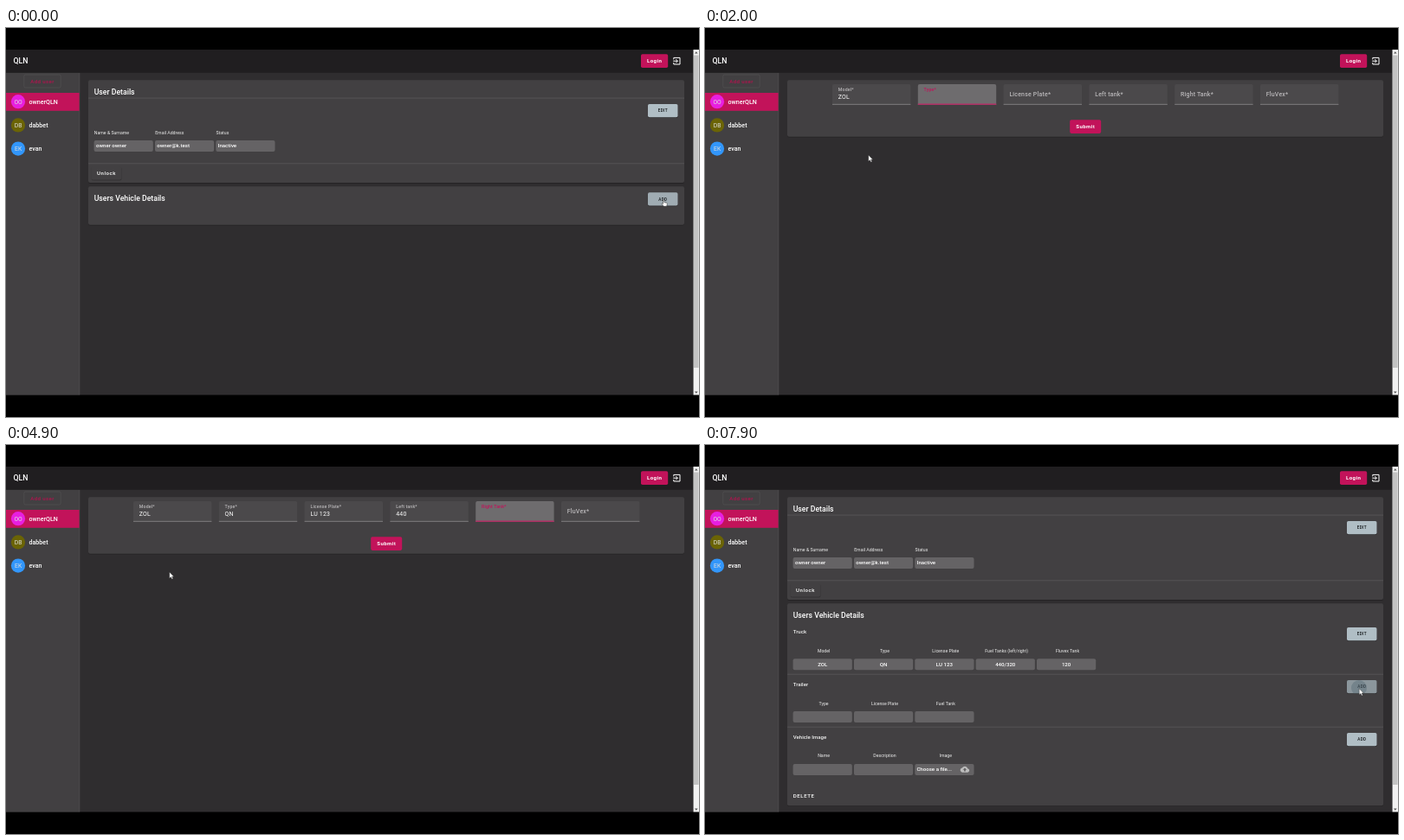
Recreate the animation shown at these times as an HTML page. Size 800 by 450 pixels, loop 8000 ms.

```html
<!DOCTYPE html>
<html lang="en">
<head>
<meta charset="utf-8">
<title>User panel</title>
<style>
html, body { margin: 0; width: 100%; height: 100%; overflow: hidden; background: #000; }
svg { display: block; width: 800px; height: 450px; font-family: Roboto, sans-serif; }
text { white-space: pre; }
</style>
</head>
<body>
<svg id="stage" viewBox="0 0 800 450"></svg>
<script>
const LOOP = 8000, PINK = '#c2135a', CARD = '#424042', WHITE = '#fff';
const stage = document.getElementById('stage');

const rect = (x, y, w, h, fill, r = 0, extra = '') =>
  `<rect x="${x}" y="${y}" width="${w}" height="${h}" rx="${r}" fill="${fill}" ${extra}/>`;

// Text placed by the middle of its capitals
function text(str, x, y, size, { fill = WHITE, weight = 500, anchor = 'start', gap = 0, extra = '' } = {}) {
  return `<text x="${x}" y="${(y + size * 0.355).toFixed(2)}" font-size="${size}" fill="${fill}" ` +
    `font-weight="${weight}" text-anchor="${anchor}" letter-spacing="${gap}" ${extra}>${str}</text>`;
}

const rule = y => rect(95, y, 688, 0.7, '#5c5a5c');
const card = (y, h) => rect(95, y + 0.8, 688, h, '#252325', 2) + rect(95, y, 688, h, CARD, 2);

function greyButton(label, y, id = '') {
  return rect(741, y + 0.8, 34.5, 15.2, '#2b292b', 1.8) +
    rect(741, y, 34.5, 15.2, '#b0bec5', 1.8, id && `id="${id}"`) +
    text(label, 758.3, y + 7.7, 4.6, { fill: '#252a2d', weight: 700, anchor: 'middle', gap: 0.35 });
}

const colX = i => 101.6 + i * 70.35;

function box(i, y, value, centred) {
  const x = colX(i);
  return rect(x, y, 68.2, 13, '#656365', 2) +
    text(value, centred ? x + 34.1 : x + 2.4, y + 6.3, 6.1, { anchor: centred ? 'middle' : 'start' });
}

function row(y, labels, values) {
  return labels.map((label, i) =>
    text(label, colX(i) + 35.5, y, 5.2, { fill: '#eee', weight: 400, anchor: 'middle' }) +
    box(i, y + 9.4, values[i] || '', true)).join('');
}

function person(y, colour, initials, name) {
  return `<circle cx="14" cy="${y}" r="8.1" fill="${colour}"/>` +
    text(initials, 14.1, y, 6.8, { fill: '#ddd', weight: 400, anchor: 'middle' }) +
    text(name, 26.5, y, 7.1);
}

const frame = rect(0, 25, 793.5, 399.5, '#2f2d2f') +
  rect(0, 51.5, 84.6, 373, CARD) + rect(84.4, 51.5, 0.8, 373, '#545254') +
  rect(0, 25, 793.5, 26.8, '#201e20') +
  text('QLN', 8.5, 38.2, 8.7) +
  rect(733, 30.2, 31.2, 15.8, PINK, 1.8) +
  text('Login', 748.7, 38, 6.2, { weight: 700, anchor: 'middle', gap: 0.35 }) +
  `<g fill="none" stroke="#fff" stroke-width="1"><path d="M770.8 36.4V34.4H778V42H770.8V40"/>
   <path d="M770.2 38.2H775.2M773.3 36.1L775.4 38.2L773.3 40.3"/></g>` +
  rect(20.8, 54, 42.4, 15, 'none', 1.8, 'stroke="#575557" stroke-width=".6"') +
  text('Add user', 42, 61.6, 6.1, { fill: '#b3124e', anchor: 'middle', gap: 0.4 }) +
  rect(0, 75, 84.6, 20.8, PINK) +
  person(85.2, '#e81fe0', 'OO', 'ownerQLN') +
  person(112.4, '#6b6405', 'DB', 'dabbet') +
  person(139.6, '#3296fa', 'EK', 'evan') +
  rect(793.5, 25, 6.5, 399.5, '#f1f1f1') + rect(794, 31.5, 5.6, 361.5, '#c3c3c3') +
  `<path d="M795 29.4L796.8 27.2L798.6 29.4ZM795 420.6L796.8 422.8L798.6 420.6Z" fill="#555"/>`;

const userCard = card(60.3, 118.8) + text('User Details', 101.7, 74.2, 8.7) + rule(80.7) +
  greyButton('EDIT', 88) +
  ['Name &amp; Surname', 'Email Address', 'Status'].map((s, i) =>
    text(s, colX(i) + 0.2, 120.9, 5.2, { fill: '#eee', weight: 400 })).join('') +
  ['owner owner', 'owner@k.test', 'Inactive'].map((s, i) => box(i, 130, s, false)).join('') +
  rule(156.5) + rect(98.5, 161, 35, 15.4, '#343234', 1.8) + rect(98.2, 160, 35, 15.4, CARD, 1.8) +
  text('Unlock', 105, 168, 6.1, { gap: 0.54 });

const vehicleTitle = text('Users Vehicle Details', 101.7, 197.3, 8.7);
const emptyVehicle = card(183.3, 44.4) + vehicleTitle + greyButton('ADD', 190.3, 'addVehicle');

const section = (name, y) => text(name, 101.7, y, 6.1, { fill: '#f0f0f0' });
const cloud = 'M19.35 10.04C18.67 6.59 15.64 4 12 4 9.11 4 6.6 5.64 5.35 8.04 2.34 8.36 0 10.91 0 14c0 3.31 2.69 6 6 6h13c2.76 0 5-2.24 5-5 0-2.64-2.05-4.78-4.65-4.96zM14 13v4h-4v-4H7l5-5 5 5z';
const fullVehicle = card(183.3, 234) + vehicleTitle +
  section('Truck', 215.5) + greyButton('EDIT', 211) +
  row(237.8, ['Model', 'Type', 'License Plate', 'Fuel Tanks (left/right)', 'Fluvex Tank'],
    ['ZOL', 'QN', 'LU 123', '440/320', '120']) +
  rule(264.8) + section('Trailer', 276.5) + greyButton('ADD', 272, 'addTrailer') +
  '<clipPath id="clip">' + rect(741, 272, 34.5, 15.2, WHITE, 1.8) + '</clipPath>' +
  '<circle id="ripple" cx="755" cy="281" r="0" fill="#586a75" fill-opacity=".45" clip-path="url(#clip)"/>' +
  row(298.7, ['Type', 'License Plate', 'Fuel Tank'], []) +
  rule(325.8) + section('Vehicle Image', 337.5) + greyButton('ADD', 333) +
  row(359.6, ['Name', 'Description', 'Image'], []) +
  text('Choose a file...', 244.4, 375.3, 6.1) +
  `<path transform="translate(294.7 370) scale(.435)" d="${cloud}" fill="#bdbdbd"/>` +
  text('DELETE', 101.8, 406.2, 6.1, { gap: 0.54 });

// focus: when the field gains focus; keys: when each character appears
const fields = [
  { label: 'Model*', value: 'ZOL', focus: 960, keys: [1450, 1550, 1670] },
  { label: 'Type*', value: 'QN', focus: 1780, keys: [2300, 2480] },
  { label: 'License Plate*', value: 'LU 123', focus: 2760, keys: [3150, 3250, 3340, 3400, 3480, 3560] },
  { label: 'Left tank*', value: '440', focus: 3670, keys: [4150, 4250, 4380] },
  { label: 'Right Tank*', value: '320', focus: 4680, keys: [4920, 4990, 5080] },
  { label: 'FluVex*', value: '120', focus: 5260, keys: [5580, 5750, 5900] }
];
const fieldX = i => 147 + i * 98.8;

const form = card(60.3, 65.4) + fields.map((f, i) => {
  const x = fieldX(i);
  return `<path id="fill${i}" d="M${x} 88.5V67q0-2 2-2h86.4q2 0 2 2V88.5Z"/>` +
    rect(x, 87.9, 90.4, 0.7, '#929092') +
    rect(x, 87.6, 90.4, 1.1, PINK, 0, `id="line${i}"`) +
    `<g id="label${i}">` + text(f.label, 0, 0, 6.96, { fill: 'inherit', gap: 0.2 }) + '</g>' +
    text('', x + 6.8, 79.8, 6.96, { weight: 400, gap: 0.2, extra: `id="value${i}"` });
}).join('') +
  rect(421.2, 106.3, 36, 15.6, PINK, 1.8) +
  text('Submit', 439.3, 114, 6.1, { weight: 700, anchor: 'middle', gap: 0.4 });

const pointers =
  '<g id="arrow"><path d="M0 0V7.2L1.7 5.7L2.9 8.2L4.1 7.6L3 5.2H5.1Z" fill="#fff" stroke="#222" stroke-width=".4"/></g>' +
  '<g id="hand"><path d="M1 0.5Q2 -.3 2.3 .8V3.2L5 3.7Q6 4 5.8 5L5.2 7.8H1.9L-.6 5Q-.5 4 .5 4.6L1 5Z" fill="#fff" stroke="#222" stroke-width=".5"/></g>';

stage.innerHTML = rect(0, 0, 800, 450, '#000') + frame +
  `<g id="details">${userCard}<g id="before">${emptyVehicle}</g><g id="after">${fullVehicle}</g></g>` +
  `<g id="form">${form}</g>` + pointers;

const el = {};
stage.querySelectorAll('[id]').forEach(n => el[n.id] = n);
const set = (id, name, value) => el[id].setAttribute(name, value);
const show = (id, on) => set(id, 'display', on ? 'inline' : 'none');
const clamp = v => Math.max(0, Math.min(1, v));
const ease = v => { v = clamp(v); return v * v * (3 - 2 * v); };

const OPEN = 200, SAVED = 6300;
const path = [ // time, x, y
  [0, 757.5, 198.5], [350, 757.5, 198.5], [600, 724, 198], [900, 190, 82],
  [1050, 190, 82], [1350, 188.7, 147], [6700, 188.7, 147], [7500, 755.2, 281.8], [8000, 755.2, 281.8]
];

function pointerAt(t) {
  const i = path.findIndex((p, k) => k + 1 < path.length && t < path[k + 1][0]);
  const [t0, x0, y0] = path[i], [t1, x1, y1] = path[i + 1];
  const k = ease((t - t0) / (t1 - t0));
  return [x0 + (x1 - x0) * k, y0 + (y1 - y0) * k];
}

function drawField(f, i, t) {
  const end = i + 1 < fields.length ? fields[i + 1].focus : SAVED;
  const focused = t >= f.focus && t < end;
  const pink = t >= f.focus + 50 && t < end + 60;
  const up = ease((t - f.focus - 50) / 150);
  const grow = ease((t - f.focus - 50) / 150);
  const x = fieldX(i), w = pink ? 90.4 * grow : 0;
  set('fill' + i, 'fill', focused ? '#6e6c6e' : '#4b494b');
  set('line' + i, 'x', x + 45.2 - w / 2);
  set('line' + i, 'width', w);
  set('label' + i, 'transform', `translate(${x + 6.8} ${76.8 - 5.5 * up}) scale(${1 - 0.25 * up})`);
  set('label' + i, 'fill', pink ? PINK : '#b9b7b9');
  el['value' + i].textContent = f.value.slice(0, f.keys.filter(k => t >= k).length);
}

function draw(t) {
  const editing = t >= OPEN && t < SAVED;
  show('details', !editing);
  show('form', editing);
  show('before', t < OPEN);
  show('after', t >= SAVED);
  if (editing) fields.forEach((f, i) => drawField(f, i, t));

  const [x, y] = pointerAt(t);
  const hand = t < OPEN;
  show('hand', hand);
  show('arrow', !hand);
  set(hand ? 'hand' : 'arrow', 'transform', `translate(${x} ${y})`);

  const hover = t >= SAVED && x > 741;
  set('addVehicle', 'fill', '#a0acb3');
  set('addTrailer', 'fill', t >= 7800 ? '#8b969c' : hover ? '#a0acb3' : '#b0bec5');
  set('ripple', 'r', 9 * clamp((t - 7800) / 100));
}

function tick() {
  draw(performance.now() % LOOP);
  requestAnimationFrame(tick);
}
tick();
</script>
</body>
</html>
```
